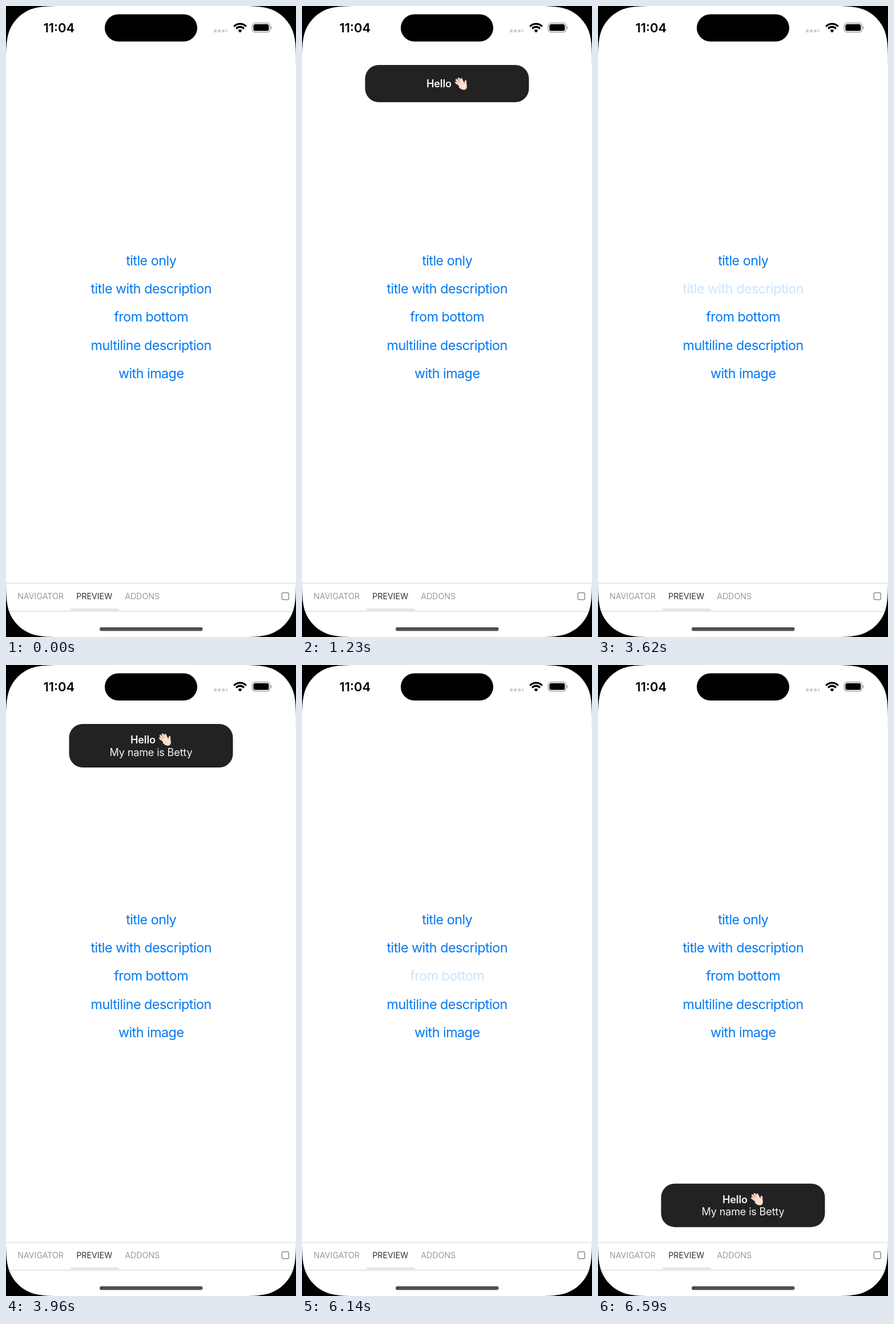
Animation of 508x1102 px, one loop 8000 ms. Source, as an HTML page:

```html
<!DOCTYPE html>
<html lang="en">
<head>
<meta charset="utf-8">
<title>Toast demo</title>
<style>
  @property --show { syntax: "<number>"; inherits: false; initial-value: 0; }

  html, body { margin: 0; width: 100%; height: 100%; overflow: hidden; background: #fff; }
  svg { display: block; width: 508px; height: 1102px; }
  text { font-family: Inter, "Liberation Sans", sans-serif; font-optical-sizing: none; }

  .time { font-size: 22px; font-weight: 600; text-anchor: middle; }
  .links text { font-size: 23.3px; letter-spacing: -.022em; text-anchor: middle; fill: #0478f2; }
  .tabs text { font-size: 14.2px; fill: #999; }
  .tabs .active { fill: #333; }

  .toast {
    --from: -41px;
    opacity: var(--show);
    transform: translateY(calc((1 - var(--show)) * var(--from)));
  }
  .toast.low { --from: 41px; }
  .card { fill: #222; }
  .title, .note { font-size: 18.1px; letter-spacing: -.01em; fill: #f4f4f4; }
  .title { font-weight: 600; }
  .note { text-anchor: middle; }

  /* Stepped like a screen recording: 1% is 80 ms */
  .toast, .links text { animation: 8s step-end infinite; }
  #toast1 { animation-name: toast1; }
  #toast2 { animation-name: toast2; }
  #toast3 { animation-name: toast3; }
  #link1 { animation-name: press1; }
  #link2 { animation-name: press2; }
  #link3 { animation-name: press3; }

  @keyframes press1 {
    0% { opacity: 1; }
    10.5% { opacity: .2; }
    11.5% { opacity: .25; }
    12.5% { opacity: .44; }
    13.5% { opacity: .7; }
    14.375% { opacity: .92; }
    15.375%, 100% { opacity: 1; }
  }
  @keyframes toast1 {
    0% { --show: 0; }
    11.5% { --show: .06; }
    12.5% { --show: .3; }
    13.5% { --show: .62; }
    14.375% { --show: .9; }
    15.375% { --show: 1; }
    37.625% { --show: .73; }
    38.75% { --show: .4; }
    40% { --show: .1; }
    41.125%, 100% { --show: 0; }
  }
  @keyframes press2 {
    0% { opacity: 1; }
    45.25% { opacity: .2; }
    46.25% { opacity: .32; }
    47.25% { opacity: .64; }
    49.5%, 100% { opacity: 1; }
  }
  @keyframes toast2 {
    0% { --show: 0; }
    46.25% { --show: .15; }
    47.25% { --show: .55; }
    49.5% { --show: 1; }
    70% { --show: .74; }
    71.125% { --show: .4; }
    72.375% { --show: .1; }
    73.5%, 100% { --show: 0; }
  }
  @keyframes press3 {
    0% { opacity: 1; }
    76.75% { opacity: .2; }
    79.375% { opacity: .28; }
    80.375% { opacity: .56; }
    81.375% { opacity: .86; }
    82.375%, 100% { opacity: 1; }
  }
  @keyframes toast3 {
    0% { --show: 0; }
    79.375% { --show: .1; }
    80.375% { --show: .45; }
    81.375% { --show: .82; }
    82.375%, 100% { --show: 1; }
  }
</style>
</head>
<body>
<svg viewBox="0 0 508 1102">
  <defs>
    <path id="corner" d="M0 0H1.529C1.088 0 .868 0 .631 .075C.373 .169 .169 .373 .075 .631C0 .868 0 1.088 0 1.529Z"/>
    <path id="fingers" d="M280 141L269.8 133.6M281 139L270.6 129.2M282 137.5L274.3 126.8M283.5 137L279 127.6M286 140L286.6 131.5"/>
    <path id="palm" d="M277 139L283 134L287.5 137C288.5 141 287.8 144 285 145.2C281.5 146 278.5 144.5 275.5 141Z"/>
    <g id="hand" stroke-linecap="round" stroke-linejoin="round">
      <g stroke="#a9796a" fill="#a9796a">
        <use href="#fingers" stroke-width="4"/>
        <use href="#palm" stroke-width="2.6"/>
      </g>
      <g stroke="#fae0cf" fill="#fae0cf">
        <use href="#fingers" stroke-width="2.8"/>
        <use href="#palm" stroke-width="1.4"/>
      </g>
    </g>
    <g id="message">
      <rect class="card" x="110.5" y="103" width="287" height="76" rx="24"/>
      <text class="title" x="218" y="137">Hello</text>
      <use href="#hand" y="-5.5"/>
      <text class="note" x="254" y="158.7">My name is Betty</text>
    </g>
    <clipPath id="stage"><path d="M0 0H508V1007H0Z"/></clipPath>
    <clipPath id="wedge"><path d="M410 46.5L394 30.5V20H426V30.5Z"/></clipPath>
  </defs>

  <rect width="508" height="1102" fill="#fff"/>

  <g class="links">
    <text id="link1" x="254.2" y="452.6">title only</text>
    <text id="link2" x="254.2" y="501.9">title with description</text>
    <text id="link3" x="254.2" y="551.2">from bottom</text>
    <text x="254.2" y="600.5">multiline description</text>
    <text x="254.2" y="649.8">with image</text>
  </g>

  <g clip-path="url(#stage)">
    <g id="toast1" class="toast">
      <rect class="card" x="110.5" y="103" width="287" height="65" rx="24"/>
      <text class="title" x="218" y="142.4">Hello</text>
      <use href="#hand"/>
    </g>
    <g id="toast2" class="toast"><use href="#message"/></g>
    <g id="toast3" class="toast low"><use href="#message" y="802.7"/></g>
  </g>

  <g class="tabs">
    <path d="M0 1008.3H508M0 1057H508" stroke="#dfdfdf" stroke-width="1.3"/>
    <rect x="113" y="1052" width="85" height="5" fill="#e6e6e6"/>
    <text x="20.3" y="1036">NAVIGATOR</text>
    <text class="active" x="123.3" y="1036">PREVIEW</text>
    <text x="208.2" y="1036">ADDONS</text>
    <rect x="483.3" y="1024.8" width="12" height="12" rx="2" fill="none" stroke="#8c8c8c" stroke-width="1.5"/>
  </g>
  <rect x="164" y="1085" width="180.5" height="6.5" rx="3.2" fill="#505050"/>

  <text class="time" x="92.8" y="46">11:04</text>
  <rect x="173" y="14.5" width="162" height="47.5" rx="23.75"/>
  <path d="M364.3 43.6H387.8" stroke="#ccc" stroke-width="4.6" stroke-dasharray="4.6 2.5"/>
  <g clip-path="url(#wedge)" fill="none" stroke="#000" stroke-width="3.3">
    <circle cx="410" cy="45.5" r="14.4"/>
    <circle cx="410" cy="45.5" r="9"/>
    <circle cx="410" cy="45.5" r="2.2" stroke-width="4.4"/>
  </g>
  <rect x="431.2" y="29.6" width="31.4" height="16.2" rx="5.2" fill="none" stroke="#999" stroke-width="1.3"/>
  <rect x="433.4" y="31.8" width="27" height="11.8" rx="3.4"/>
  <path d="M464.2 35.2Q466 36 466 37.7T464.2 40.2Z" fill="#999"/>

  <use href="#corner" transform="scale(71)"/>
  <use href="#corner" transform="translate(508) scale(-71 71)"/>
  <use href="#corner" transform="translate(0 1102) scale(71 -71)"/>
  <use href="#corner" transform="translate(508 1102) scale(-71)"/>
</svg>
</body>
</html>
```
